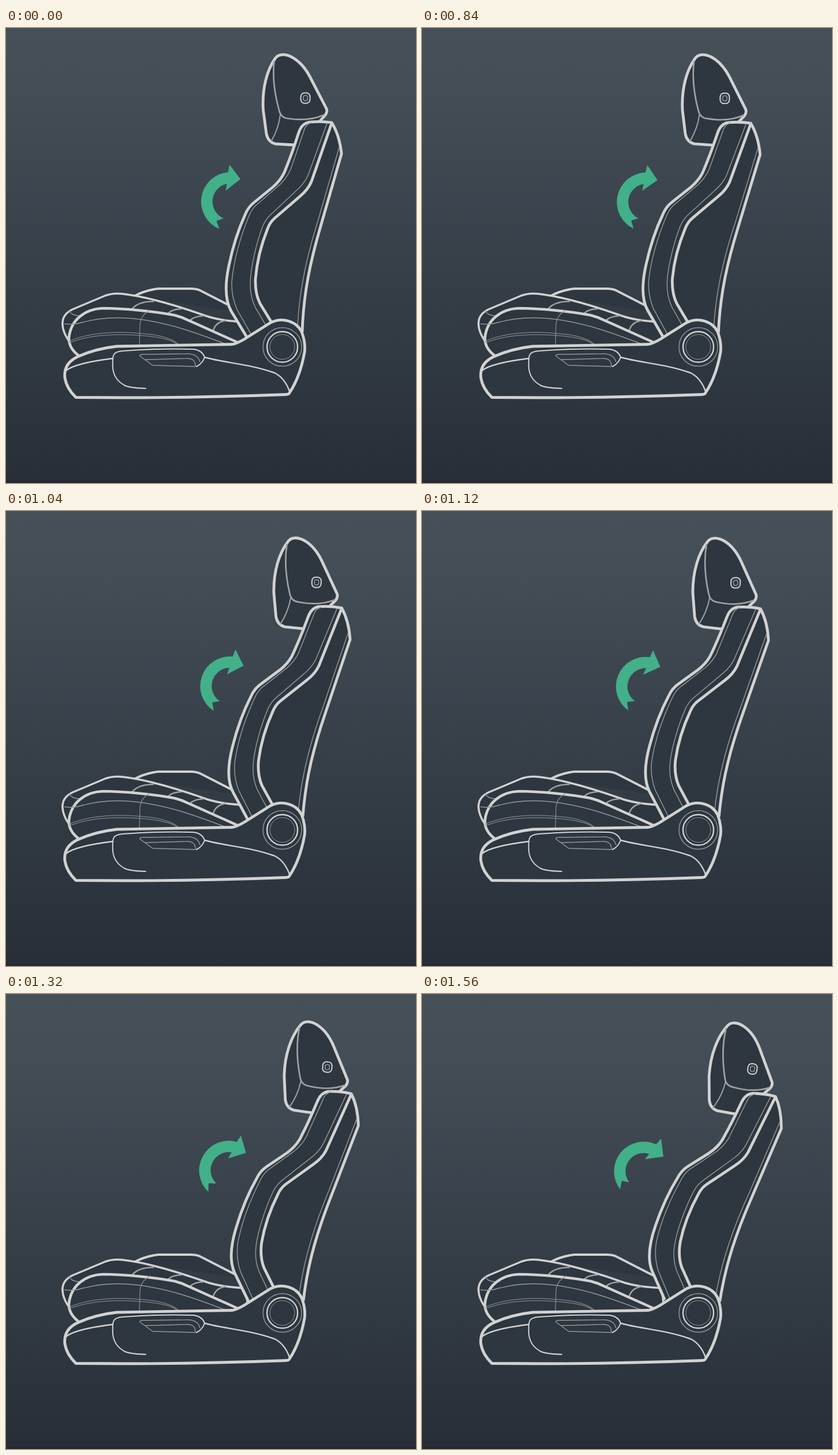
An HTML page for the animation above (2.08 s loop, 710 by 789 pixels).

```html
<!DOCTYPE html>
<html lang="en">
<head>
<meta charset="utf-8">
<title>Seat recline</title>
<style>
  html, body { margin: 0; height: 100%; overflow: hidden; background: #282e39; }
  svg { display: block; width: 710px; height: 789px; }
  path, circle, .button { fill: none; stroke: #d2d2d2; stroke-width: 2.4; stroke-linecap: round; stroke-linejoin: round; }
  .body { fill: #2e363f; }
  .bold { stroke-width: 4.8; }
  .mid { stroke-width: 4; }
  .thin { stroke: #92969a; stroke-width: 1.5; stroke-linecap: butt; }
  .seam { stroke: #a0a2a4; stroke-width: 2.7; stroke-linecap: butt; }
  #arrow { fill: #42b088; stroke: none; }
</style>
</head>
<body>
<svg viewBox="0 0 710 789">
  <defs>
    <linearGradient id="sky" x2="0" y2="1">
      <stop stop-color="#465058"/>
      <stop offset=".15" stop-color="#434d56"/>
      <stop offset="1" stop-color="#272e38"/>
    </linearGradient>
  </defs>
  <rect width="710" height="789" fill="url(#sky)"/>
  <rect y="785" width="710" height="4" fill="#232a36"/>

  <g id="cushion">
    <path class="body mid" d="M222 465Q240 455 263 452H320Q330 452 337 455.500L412 494"/>
    <path class="body" style="stroke-width:3.5" d="M112 546C102 535 97 520 98 510Q99 496 115 488L172 464Q186 459 202 461C245 466 300 483 340 497Q368 508 415 510L420 550H130"/>
    <path class="thin" d="M109 489Q112 498 126 499"/>
    <path class="seam" d="M218 488Q228 474 256 474M280 497Q284 488 304 487M319 507Q325 500 343 499M359 524Q363 510 381 507"/>
    <path class="body" style="stroke-width:4.6" d="M127 569Q108 555 109 537C112 505 138 487 168 486C205 486 260 492 292 498Q304 501 316 507L403 546"/>
    <path class="thin" d="M101 513Q118 515 130 511C165 501 200 500 238 506C290 514 330 529 378 547"/>
    <path class="thin" style="stroke-width:1.1" d="M109 543Q150 526 210 528C255 530 285 535 299 549M109 546Q150 530 210 532C255 533 290 540 296 549M250 489Q233 497 232 515L231 551"/>
  </g>

  <g id="back">
    <path class="body bold" d="M502 203L467 201Q454 198 451 184L445.500 143C443 105 452 73 466 53C472 44 484 45 494 50C510 58 519 71 526 84L555 140Q557 145 553 151L543 162"/>
    <path class="seam" d="M464.500 57C461 85 466 118 473 143Q476 156 489 157C515 161 537 157 552 150"/>
    <path class="seam" style="stroke-width:2" d="M475 150C473 168 466 185 459 197"/>
    <rect class="button" x="510.500" y="112.500" width="16" height="18" rx="6.500" style="stroke-width:2"/>
    <rect class="button thin" x="514.800" y="117" width="7.400" height="9" rx="3"/>
    <path class="body bold" d="M417 536L390 491C378 470 380 440 386 412C393 378 403 348 414 324Q419 311 429 303L462 276Q477 263 483 248C492 226 500 203 507 181Q512 166 524 163.500Q545 161 564 164C574 180 579 200 581 218L544.500 345C527 405 515 460 513 527"/>
    <path class="thin" d="M529 164Q518 167 515 181L493 245Q487 259 475 271L437 304Q427 311 421 325C404 367 394 405 391 440Q390 465 400 488L426 534M556 165L524 253Q519 266 507 278L459 323Q449 332 444 345C433 375 424 415 423 440Q422 465 432 485L452 519M577 207L540 335C521 395 508 455 505 515"/>
    <path class="bold" d="M564 165L529 266Q523 280 510 291L465 330Q457 337 453 348C441 378 434 410 432 435Q431 460 440 478L462 514"/>
  </g>

  <g id="base">
    <path class="body bold" d="M121 640.500Q105 625 102 607Q99 582 124 570Q155 556 192 552L392 548.500Q400 547 412 540L458 511C480 500 504 510 512 527Q519 545 517 562C512 590 503 615 490 634Q489 635 486 635.500C370 640 250 642 121 640.500Z"/>
    <path d="M104 594Q120 581 185 573M344 571C380 581 420 582 465 598Q482 606 491 630"/>
    <path style="stroke-width:2" d="M242 625Q214 624 206 620Q187 610 185 590Q184 570 187 566Q190 561 202 560C240 557 290 556 325 557Q340 559 344 571Q340 582 330 587"/>
    <path class="thin" d="M330 587L254 585 232 569Q231 566 236 566L312 565Q332 564 336 579M241 575L312 573Q328 572 328 586"/>
    <circle class="thin" cx="478.500" cy="553" r="33.500"/>
    <circle cx="478.500" cy="553" r="26.500"/>
    <circle class="thin" cx="478.500" cy="553" r="21.500" style="stroke-width:1"/>
  </g>

  <path id="arrow" d="M369.500 348.500L364.500 334.500 377 330A31.600 31.600 0 0 1 382.500 270L380.500 282 406 262 387 237 384.500 250A51.300 51.300 0 0 0 369.500 348.500Z"/>
</svg>
<script>
  const LOOP = 2080, STEP = 40, START = 753, END = 1560;
  const back = document.getElementById('back');
  const arrow = document.getElementById('arrow');
  const rotate = (part, angle, x, y) => part.setAttribute('transform', `rotate(${angle} ${x} ${y})`);
  const origin = performance.now();

  function draw() {
    const elapsed = performance.now() - origin;
    const time = Math.floor(elapsed % LOOP / STEP) * STEP;
    const progress = Math.min(1, Math.max(0, (time - START) / (END - START)));
    rotate(back, 7.2 * progress, 478.5, 553);
    rotate(arrow, 30 * progress, 374.7, 294.4);
    requestAnimationFrame(draw);
  }
  draw();
</script>
</body>
</html>
```
